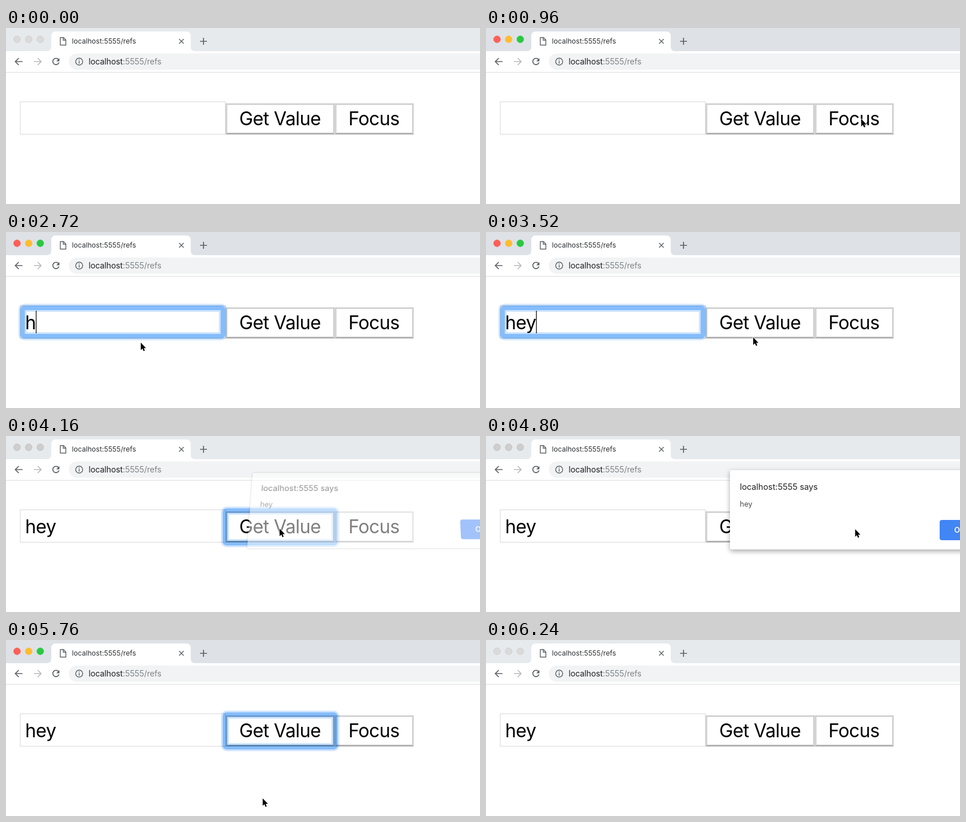
Write an HTML page that moves like this. It is 816 px wide and 304 px high and loops after 6.32 s.

```html
<!DOCTYPE html>
<html lang="en">
<head>
<meta charset="utf-8">
<title>Refs demo</title>
<style>
html, body { margin: 0; width: 100%; height: 100%; overflow: hidden; background: #fff; }
body { position: relative; font-family: Inter, Roboto, sans-serif; font-optical-sizing: none; }
svg { position: absolute; left: 0; top: 0; display: block; }
.big { font-size: 32px; letter-spacing: -.6px; }
.icon { fill: none; stroke: #5f6368; stroke-width: 1.7; }
.thin { stroke-width: 1.4; }
.ring { fill: none; mix-blend-mode: multiply; visibility: hidden; }
#dialog {
  position: absolute; left: 420px; top: 59px; width: 448px; height: 137px;
  background: #fff; border-radius: 3px; color: #202124;
}
#dialog > * { position: absolute; left: 17px; line-height: 20px; white-space: nowrap; }
#says { top: 19px; font-size: 14.3px; }
#message { top: 49px; font-size: 12.5px; color: #4a4d51; }
#dialog #ok {
  left: 361px; top: 86px; width: 69px; height: 35px; border-radius: 4px; line-height: 35px;
  text-align: center; font-size: 13px; font-weight: 600; color: #fff;
}
</style>
</head>
<body>
<svg width="816" height="304">
  <rect id="titlebar" width="816" height="40"/>
  <g id="lights"></g>
  <path d="M70 40q8 0 8-8V14q0-8 8-8H310q8 0 8 8V32q0 8 8 8Z" fill="#fff"/>
  <path d="M93.5 16.5h5.5l4 4v9h-9.5zM98.5 16.5v4.5h4.5" class="icon thin"/>
  <text x="113.5" y="27" font-size="12" letter-spacing=".05" fill="#2b2e31">localhost:5555/refs</text>
  <path d="M298 19l8 8m0-8l-8 8" class="icon thin"/>
  <path d="M334 23h12m-6-6v12" class="icon"/>
  <rect y="76" width="816" height="1" fill="#dcdddf"/>
  <path d="M28.5 58H16.5M22 52l-6 6 6 6" class="icon"/>
  <path d="M48 58H60M54.5 52l6 6-6 6" class="icon" style="stroke:#b9bbbe"/>
  <path d="M90.5 54.5A5.5 5.5 0 1 0 91.3 59.5" class="icon"/>
  <path d="M92 52v5.5h-5.5z" fill="#5f6368"/>
  <rect x="108" y="44" width="730" height="28" rx="14" fill="#f1f3f4"/>
  <circle cx="126" cy="58" r="6" class="icon thin"/>
  <path d="M126 57v4.5M126 54.3v1.5" class="icon thin"/>
  <text x="142.3" y="63" font-size="14" letter-spacing="-.12" fill="#202124">localhost<tspan fill="#80868b">:5555/refs</tspan></text>

  <rect x="24.5" y="127.5" width="353" height="56" fill="#fff" stroke="#d9d9d9"/>
  <text id="value" class="big" x="33" y="168"></text>
  <g id="buttons"></g>
  <g id="rings"></g>
  <rect id="caret" y="136" width="1.2" height="39"/>
</svg>

<div id="dialog">
  <div id="says">localhost:5555 says</div>
  <div id="message">hey</div>
  <div id="ok">OK</div>
</div>

<svg width="816" height="304">
  <g id="cursor">
    <path d="M0 0V14L3.2 11.2 5.3 16 7.6 15 5.6 10.3H9.8Z" transform="scale(.92)" stroke="#fff" stroke-width="1.4" stroke-linejoin="round" paint-order="stroke"/>
  </g>
</svg>

<script>
const LOOP = 6320, STEP = 80;
const $ = id => document.getElementById(id);
const within = (t, from, to) => t >= from && t < to;
const clamp = (v, min, max) => Math.min(max, Math.max(min, v));
const ease = k => k * k * (3 - 2 * k);

// The pointer glides between these stops.
const entry = { x: 566, y: 292 };
const glides = [
  { from: 80, to: 720, x: 646, y: 157 },
  { from: 1440, to: 1680, x: 640, y: 164 },
  { from: 2000, to: 2560, x: 232, y: 191 },
  { from: 3280, to: 3520, x: 460, y: 182 },
  { from: 3520, to: 3680, x: 483, y: 166 },
  { from: 3680, to: 3920, x: 471, y: 160 },
  { from: 4560, to: 5040, x: 800, y: 162 },
  { from: 5360, to: 5520, x: 776, y: 184 },
  { from: 5520, to: 5840, x: 380, y: 290 }
];

function pointerAt(t) {
  let { x, y } = entry;
  for (const glide of glides) {
    const k = ease(clamp((t - glide.from) / (glide.to - glide.from), 0, 1));
    x += (glide.x - x) * k;
    y += (glide.y - y) * k;
  }
  return [x, y];
}

function addRing(id, x, y, width, height) {
  const box = `x="${x}" y="${y}" width="${width}" height="${height}" rx="3"`;
  $("rings").innerHTML += `<g id="${id}" class="ring">
    <rect ${box} stroke="#d0e5fe" stroke-width="14"/>
    <rect ${box} stroke="#85bdfc" stroke-width="8"/></g>`;
}

function addButton(ring, label, x, width) {
  const right = x + width;
  $("buttons").innerHTML += `
    <rect x="${x + 1.5}" y="131.5" width="${width - 3}" height="51" fill="#fff" stroke="#d3d3d3" stroke-width="3"/>
    <path d="M${x} 184l3-3H${right - 3}l3 3Z" fill="#b2b2b2"/>
    <text class="big" x="${x + 23.5}" y="168">${label}</text>`;
  addRing(ring, x - 1, 129, width + 2, 56);
}

const lightColors = ["#ff5f57", "#ffbd2e", "#28c940"];
$("lights").innerHTML = lightColors.map((_, i) => `<circle cx="${19 + 20 * i}" cy="19.5" r="5.8"/>`).join("");
addButton("valueRing", "Get Value", 378, 188);
addButton("focusRing", "Focus", 566, 136);
addRing("inputRing", 28.5, 131, 345, 49);

const show = (id, on) => $(id).style.visibility = on ? "visible" : "hidden";

function drawWindow(t) {
  const alerting = within(t, 4080, 5600);
  const active = within(t, 960, 6240) && !alerting;
  $("titlebar").setAttribute("fill", active ? "#dee1e6" : "#e7eaed");
  [...$("lights").children].forEach((dot, i) => {
    dot.setAttribute("fill", active ? lightColors[i] : alerting ? "#cecece" : "#dadada");
    dot.setAttribute("stroke", active ? lightColors[i] : alerting ? "#c0c0c0" : "#d0d0d0");
  });
  show("focusRing", within(t, 1520, 1680));
  show("valueRing", within(t, 4000, 4240) || within(t, 5600, 6240));
}

function drawInput(t) {
  const keyDelay = 240, typingStart = 2720;
  const typed = clamp(Math.floor((t - typingStart) / keyDelay) + 1, 0, 3);
  const lastInput = typed ? typingStart + (typed - 1) * keyDelay : 1680;
  const focused = within(t, 1680, 3920);
  $("value").textContent = "hey".slice(0, typed);
  $("caret").setAttribute("x", 33 + $("value").getComputedTextLength());
  show("caret", focused && (t - lastInput) % 1000 < 500);
  show("inputRing", focused);
}

function drawDialog(t) {
  const closing = t > 5200;
  const opacity = clamp(closing ? (5600 - t) / 200 : (t - 4080) / 160, 0, 1);
  const tilt = Math.min(18, 36 * (1 - opacity));
  const lift = closing ? 3 * (opacity - 1) : 0;
  const dialog = $("dialog").style;
  dialog.opacity = opacity;
  dialog.transform = `translateY(${lift}px) perspective(1000px) rotateX(${tilt}deg)`;
  dialog.boxShadow = t < 4240 ? "0 0 3px rgba(0,0,0,.45)" : "0 3px 9px rgba(0,0,0,.35)";
  $("ok").style.background = within(t, 5200, 5360) ? "#3371dc" : "#4285f4";
}

function draw(t) {
  drawWindow(t);
  drawInput(t);
  drawDialog(t);
  $("cursor").setAttribute("transform", `translate(${pointerAt(t)})`);
  show("cursor", within(t, 160, 2800) || within(t, 3360, 6000));
}

function frame() {
  const t = performance.now() % LOOP;
  draw(Math.floor(t / STEP) * STEP);
  requestAnimationFrame(frame);
}
frame();
</script>
</body>
</html>
```
